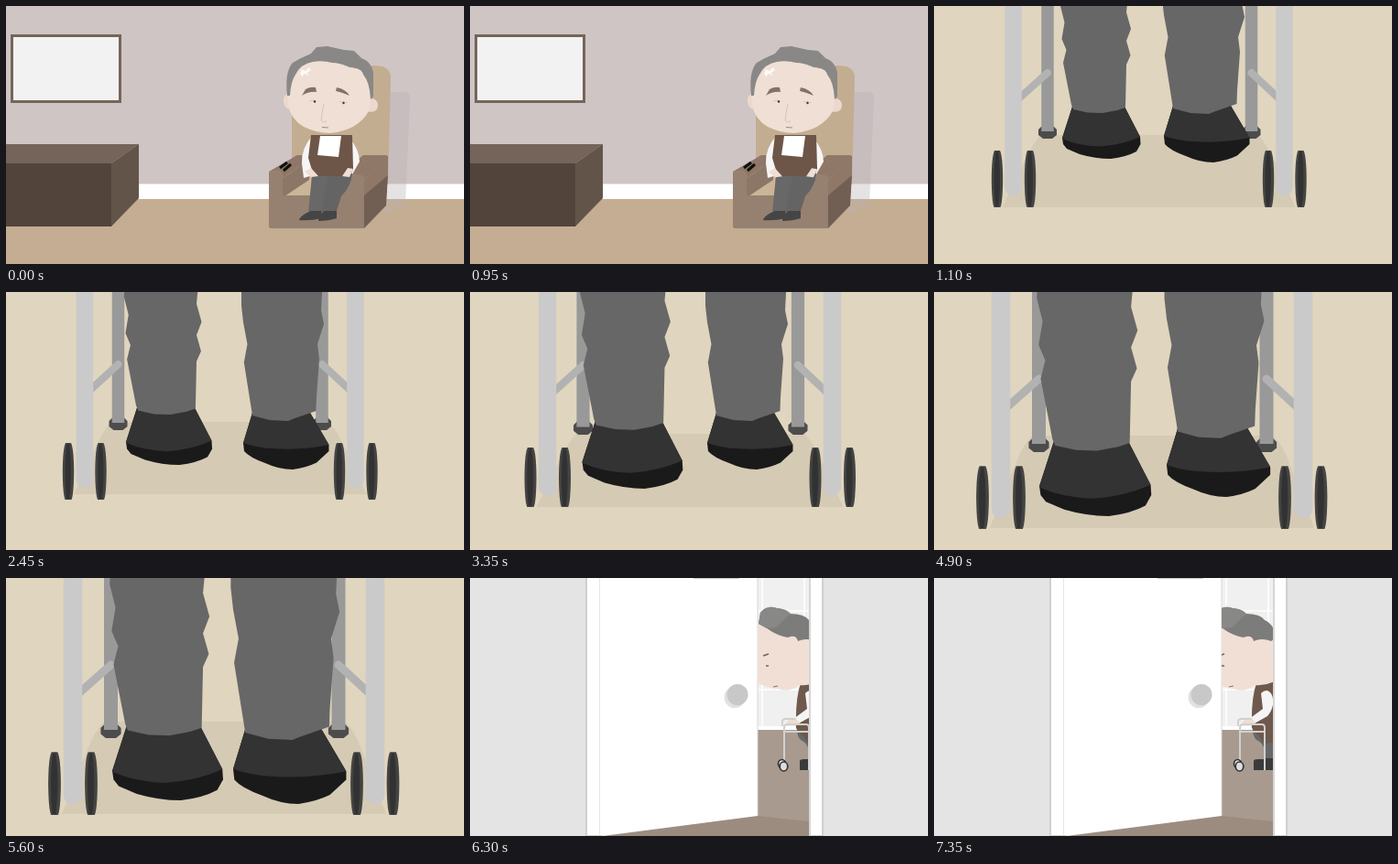
Animation of 500x282 px, one loop 8050 ms. Source, as an HTML page:

```html
<!DOCTYPE html>
<html lang="en">
<head>
<meta charset="utf-8">
<title>Walking with a frame</title>
<style>
  html, body { margin: 0; width: 100%; height: 100%; overflow: hidden; background: #e0d5be; }
  svg { display: block; width: 100%; height: 100%; }
</style>
</head>
<body>
<svg viewBox="0 0 500 282">
  <defs>
    <clipPath id="gap"><path d="M314 0H370V282H314z"/></clipPath>
    <g id="wheel">
      <path d="M-3-62H3Q6-56 6.2-31Q6-6 3.500 0H-3.500Q-6-6-6.2-31Q-6-56-3-62z" fill="#444"/>
      <path d="M-1.500-61H1Q3-50 3-31Q3-12 1-1H-2Q-3.500-12-3.500-31Q-3.500-50-1.500-61z" fill="#323232"/>
    </g>
    <path id="cap" d="M-10-10L-6-14H6L10-10V-4L5 0H-5L-10-4z" fill="#4c4c4c"/>
  </defs>

  <g id="room">
    <path d="M0 0H500V196H0z" fill="#cfc5c4"/>
    <path d="M0 194.500H500V212H0z" fill="#fff"/>
    <path d="M0 211H500V282H0z" fill="#c5ad93"/>
    <path d="M6.500 32.500H124.500V104.500H6.500z" fill="#f3f2f2" stroke="#74665a" stroke-width="3"/>
    <path d="M0 151H145L115 172H0z" fill="#756459"/>
    <path d="M0 172H115V241H0z" fill="#52443b"/>
    <path d="M115 172L145 151V210L115 241z" fill="#63544a"/>
    <path d="M410 94H436Q441 94 441 100L436 217L412 229z" fill="#b8afb4" opacity=".36"/>

    <path d="M312 96Q312 72 330 68L398 65Q420 64 420 78L417 195H312z" fill="#c3ad90"/>
    <path d="M301 208L325 187H366L391 208z" fill="#cab597"/>
    <path d="M301 189L331 168V190L301 210z" fill="#8c7666"/>
    <path d="M287 181L318 163H331V168L301 189z" fill="#8f7867"/>
    <path d="M287 183Q287 180 290 180H299Q302 181 302 185V207H391V243H289Q287 243 287 240z" fill="#968171"/>
    <path d="M363 185L390 163H414Q418 163 417 167L391 190z" fill="#8f7867"/>
    <path d="M363 184Q364 181 368 182L389 185Q391 186 391 190V209H364z" fill="#968171"/>
    <path d="M391 190L417 166V186L391 208z" fill="#8f7867"/>
    <path d="M391 207L417 185L415 218L391 243z" fill="#715f53"/>
    <path d="M299 177L307 171M303 180L311 173" stroke="#111" stroke-width="3.200"/>

    <path d="M335 141Q322 156 323 172L325 188L338 184L340 145zM374 143Q386 157 386 170L378 184H368z" fill="#f7f5f5"/>
    <path d="M334 185H357L346 227H330z" fill="#686868"/>
    <path d="M352 185L378 183Q377 197 366 208L360 227H344L350 196z" fill="#646464"/>
    <path d="M320 234Q321 229 333 224H344V232Q334 235 320 234zM341 235Q341 229 348 224H361V232Q352 235 341 235z" fill="#464546"/>
    <path d="M333 141H378L379 178L376 186H336L330 166z" fill="#6d5648"/>
    <path d="M343 142H366L363 165L340 163z" fill="#fff"/>
    <g id="hands" fill="#f0ddd3">
      <path d="M326 181L333 177L341 186L333 187zM379 178L373 177L367 186L375 187z"/>
    </g>
    <path d="M312 95Q302 95 303 105Q304 115 314 112zM396 101Q406 100 406 109Q405 118 394 115z" fill="#ecd8cc"/>
    <path d="M308 80V108Q311 124 325 132Q339 139 354 139Q384 136 396 115Q400 100 399 80Q390 54 350 54Q312 55 308 80z" fill="#f0dfd4"/>
    <path d="M307 98Q304 72 313 62L322 57L333 52L339 45L351 44L369 48L380 49L388 57Q399 61 401 73V99L398 102Q397 83 390 75Q389 68 375 67Q364 62 356 62Q345 59 335 61Q322 63 316 75Q311 82 310 98z" fill="#898887"/>
    <path d="M323 69L327 71L331 67L333 70L329 73L330 76L326 74L323 77L321 74z" fill="#fff" opacity=".8"/>
    <path d="M323 98L327 91Q332 88 338 89L339 94Q331 93 323 98zM360 93L361 89Q371 91 375 98Q366 94 360 93z" fill="#827268"/>
    <path d="M347 107Q345 117 344 125Q346 128 350 126" fill="none" stroke="#d8c1b5"/>
    <path d="M345 132.500L352 133" fill="none" stroke="#a0897d"/>
    <path d="M331 104Q335 102 339 104M364 105Q368 103 372 106" fill="none" stroke="#d3beb3" stroke-width=".8"/>
    <g id="eyes" fill="#41342f">
      <ellipse cx="337" cy="104.500" rx="1.200" ry="1.300"/><ellipse cx="368.500" cy="106" rx="1.200" ry="1.300"/>
    </g>
  </g>

  <g id="steps">
    <path d="M0 0H500V282H0z" fill="#e0d5be"/>
    <g id="frameBack"></g>
    <g id="leftLeg">
      <path d="M151 110L140 144L141 151L145 156L159 162Q176 167 193 167Q210 165 221 159L225.500 151L225 143L208 110z" fill="#1a1a1a"/>
      <path d="M151 110L140 145Q158 153 181 153.500Q205 152 225 143L208 110z" fill="#333"/>
      <path d="M139-14L138 0L142.500 18L139.500 36L144.500 48L141 62L150 108L152 113L168 116.500L184 117L200 114L209 111L210 64L214.500 54L210 38L215 25L210 7L212-14z" fill="#676767"/>
    </g>
    <g id="rightLeg">
      <path d="M261 109L251 142L252 151Q258 158 275 164Q290 171 305 171Q320 169 331 163.500L344.500 151V144L324 109z" fill="#1a1a1a"/>
      <path d="M261 109L251 142Q262 146 275 147.500Q312 151 344.500 144L324 109z" fill="#333"/>
      <path d="M249-40V-8L251 10L255.500 34L251.800 54L261 112L280 117L300 118L306 115.500L330.500 107L331 92L334 50L332 34L339 12L336-3L338-40z" fill="#676767"/>
    </g>
    <g id="frameFront"></g>
  </g>

  <g id="doorway">
    <path d="M0 0H500V282H0z" fill="#e4e4e4"/>
    <path d="M126 0H386V282H126z" fill="#fff"/>
    <path d="M127 0V282M385 0V282" stroke="#d0d0d0" stroke-width="2"/>
    <path d="M141.500 0V282" stroke="#e6e6e6"/>
    <path d="M244 0H294" stroke="#999"/>
    <path d="M314 0H370V165H314z" fill="#f0f0f0"/>
    <path d="M319 0V165M365 0V165M314 36H370M314 81H370M314 122H370" stroke="#fff" stroke-width="1.500"/>
    <path d="M314 162H370V166H314z" fill="#fff"/>
    <path d="M314 166H370V266H314z" fill="#a89a8e"/>
    <path d="M145 282L314 260L370 266V282z" fill="#9c8c80"/>
    <path d="M314 0V260" stroke="#d8d8d8"/>
    <circle cx="289" cy="130.500" r="11.500" fill="#e1e1e1"/>
    <circle cx="292" cy="127.500" r="11.500" fill="#c8c8c8"/>
    <g clip-path="url(#gap)"><g id="walker">
      <path id="foot" d="M349 200Q349 198 354 198H361L362 182H371V210H349z" fill="#3b3b3b"/>
      <path d="M348 160L384 164V197H362Q362 181 352 177Q347 172 348 160z" fill="#686868"/>
      <path d="M352 115Q363 108 384 112V178L361 181L347 164Q346 132 352 115z" fill="#6f584c"/>
      <path d="M357 126Q364 119 369 128Q373 140 364 151L348 160L344 154L359 143z" fill="#f6f5f5"/>
      <path d="M347 153L351 159Q343 163 336 158L340 154z" fill="#f0ddd2"/>
      <path d="M306 48Q314 40 345 43L384 58V104Q368 119 350 117Q339 126 327 121Q314 120 300 112z" fill="#f1dfd5"/>
      <path d="M308 38Q315 29 326 33Q337 34 340 39Q356 39 361 46Q372 51 373 66L368 69Q358 65 349 69Q347 61 338 65Q326 63 315 55L306 50z" fill="#7c7c7b"/>
      <path d="M308 38Q315 29 326 33Q337 34 341 39L325 54L315 55L306 50z" fill="#888887"/>
      <path d="M311 85L317 83M314 96H317" stroke="#6f625b" stroke-width="1.500"/>
      <path d="M322 119L327 118" stroke="#8a6f75"/>
      <g fill="none" stroke="#d0d0d0" stroke-width="2">
        <path d="M332 162V157Q332 154 336 154H346M334 201V164Q334 160 338 160H358Q361 160 361 164V210M334 168H361"/>
      </g>
      <g fill="#ddd" stroke="#333" stroke-width="1.700">
        <ellipse cx="331.500" cy="203" rx="4" ry="4.500"/><ellipse cx="333.500" cy="206" rx="4.300" ry="5"/>
      </g>
    </g></g>
    <path d="M371 0V282" stroke="#d6d6d6" stroke-width="2"/>
    <path d="M126 281.500H145M370 281.500H386" stroke="#d0d0d0"/>
  </g>
</svg>
<script>
const LOOP = 8050;
const $ = id => document.getElementById(id);

// Each track is a list of [start time, value]; values are held until the next step.
const scenes = [[0, 'room'], [1100, 'steps'], [6300, 'doorway']];
const hands = [[0, [0, 0]], [50, [0, -.4]], [200, [0, .3]], [400, [.3, -.3]], [450, [0, 0]],
  [600, [-.3, .3]], [800, [.2, 0]], [900, [0, -.4]], [950, [0, .2]]];
const eyes = [[0, 1], [400, .7], [450, .3], [600, 1], [800, .6], [850, .2], [950, 1]];

// x of the shoe edge, y of the sole, scale
const leftLeg = [[0, [140, 167, 1]], [1600, [133, 184, 1.07]], [1900, [131, 189, 1.1]],
  [3350, [122.5, 215, 1.285]], [3750, [121.5, 215, 1.28]], [4900, [115, 245, 1.43]], [5600, [116, 243, 1.415]]];
const rightLeg = [[0, [251, 171, 1]], [1600, [258, 193, 1]], [1900, [259, 194, 1]],
  [3750, [253, 225, 1.2]], [4900, [254, 224, 1.21]], [5600, [248, 247, 1.32]]];

const frame = [
  [0,    { posts: [86.5, 382.5], back: [124, 346.5], wheels: [69, 105, 365, 400.5], ground: 220, size: 1, cap: 145, joint: 73, shade: [141, 220] }],
  [2450, { posts: [86, 381.5], back: [122.5, 345], wheels: [68, 103.5, 364, 399.5], ground: 227, size: 1, cap: 151, joint: 79, shade: [142, 221] }],
  [2500, { posts: [84.5, 395.5], back: [123.5, 358], wheels: [66, 103.5, 377, 414.5], ground: 235, size: 1.05, cap: 156, joint: 80, shade: [155, 235] }],
  [4300, { posts: [72, 402], back: [113, 361.5], wheels: [52, 92, 382, 421.5], ground: 255, size: 1.12, cap: 170, joint: 91, shade: [154, 255] }],
  [4350, { posts: [73, 403], back: [114.5, 363], wheels: [53, 93, 383, 422.5], ground: 259, size: 1.11, cap: 175, joint: 95, shade: [157, 258] }]
];
const walker = [[0, 9], [6750, 0]];
const foot = [[0, 2], [7350, 0]];

const at = (track, t) => track.reduce((held, [start, value]) => t >= start ? value : held, track[0][1]);
const line = (x1, y1, x2, y2, color, width, cap = 'butt') =>
  `<path d="M${x1} ${y1}L${x2} ${y2}" stroke="${color}" stroke-width="${width}" stroke-linecap="${cap}"/>`;
const use = (id, x, y, s) => `<use href="#${id}" transform="translate(${x} ${y}) scale(${s})"/>`;

function drawFrame({ posts, back, wheels, ground, size, cap, joint, shade: [top, bottom] }) {
  const [l, r] = posts, [bl, br] = back;
  const shadow = `<path d="M${bl - 7} ${top}H${br + 7}Q${br + 13} ${top + 5} ${br + 21} ${top + 20}` +
    `L${r + 12} ${bottom}H${l - 12}L${bl - 21} ${top + 20}Q${bl - 13} ${top + 5} ${bl - 7} ${top}z" fill="#d5cab4"/>`;
  const rear = x => use('cap', x, cap, size) + line(x, -5, x, cap - 8 * size, '#999', 13.5 * size);
  const strut = (x, post) => line(x, joint, post, joint + 30 * size, '#b2b2b2', 8 * size, 'round');
  const post = x => line(x, -10, x, ground - 22, '#cacaca', 18.5 * size, 'round');
  $('frameBack').innerHTML = shadow + rear(bl) + rear(br) + strut(bl, l + 4) + strut(br, r - 4);
  $('frameFront').innerHTML = posts.map(post).join('') + wheels.map(x => use('wheel', x, ground, size)).join('');
}

function placeLeg(id, [x, y, s], originX, originY) {
  $(id).setAttribute('transform', `translate(${x} ${y}) scale(${s}) translate(${-originX} ${-originY})`);
}

let shownFrame;
function draw(t) {
  const scene = at(scenes, t);
  for (const [, id] of scenes) $(id).style.display = id === scene ? '' : 'none';
  if (scene === 'room') {
    const open = at(eyes, t);
    $('hands').setAttribute('transform', `translate(${at(hands, t)})`);
    $('eyes').setAttribute('transform', `translate(0 ${105.5 * (1 - open)}) scale(1 ${open})`);
  } else if (scene === 'steps') {
    const pose = at(frame, t);
    if (pose !== shownFrame) drawFrame(shownFrame = pose);
    placeLeg('leftLeg', at(leftLeg, t), 140, 167);
    placeLeg('rightLeg', at(rightLeg, t), 251, 171);
  } else {
    $('walker').setAttribute('transform', `translate(${at(walker, t)} 0)`);
    $('foot').setAttribute('transform', `translate(${at(foot, t)} 0)`);
  }
}

const start = performance.now();
function tick() {
  draw((performance.now() - start) % LOOP);
  requestAnimationFrame(tick);
}
tick();
</script>
</body>
</html>
```
